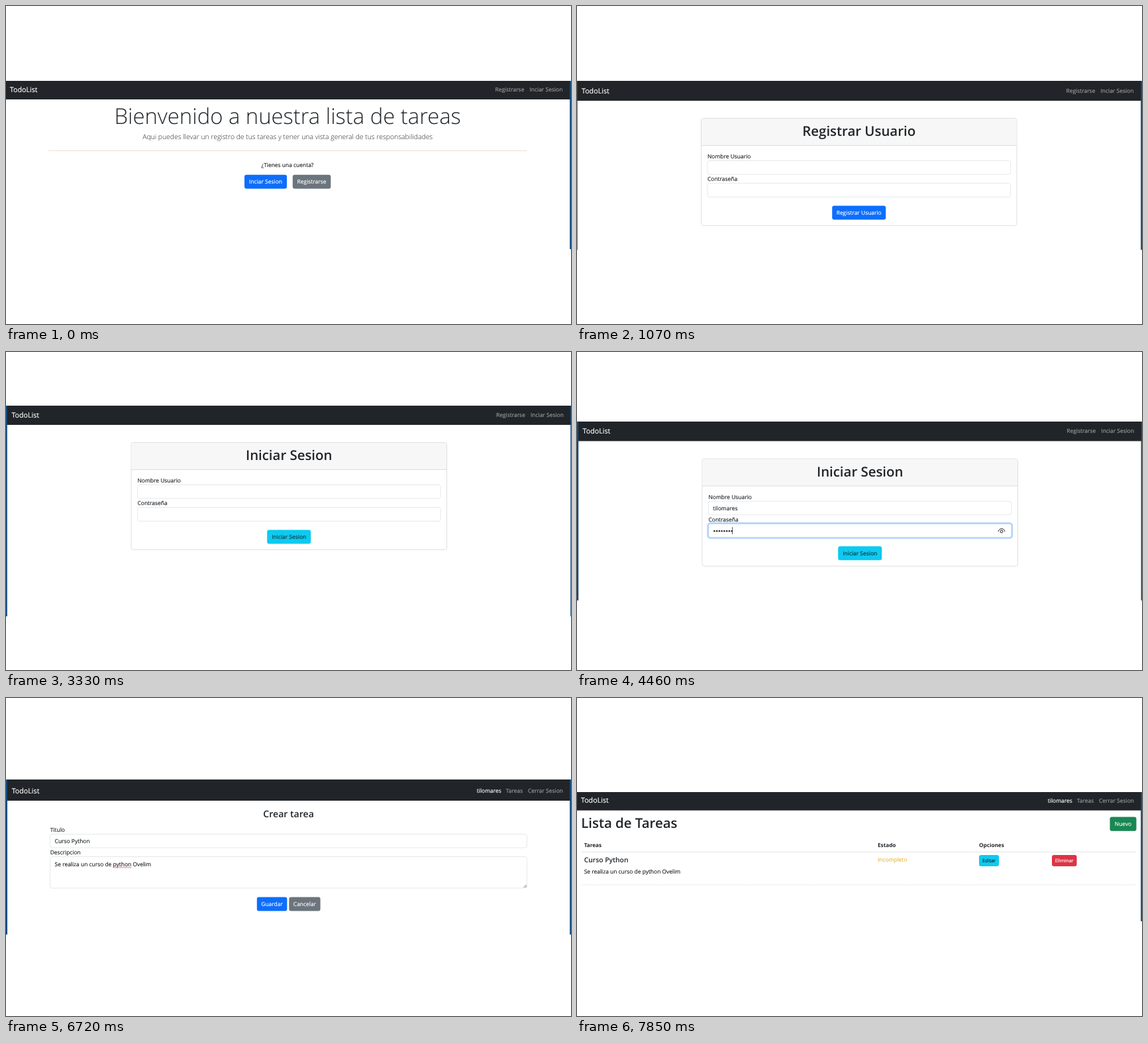
An HTML page for the animation above (8 s loop, 853 by 480 pixels).

```html
<!DOCTYPE html>
<html lang="es">
<head>
<meta charset="utf-8">
<title>TodoList</title>
<style>
  html, body { margin: 0; width: 100%; height: 100%; overflow: hidden; background: #fff; }
  svg { display: block; width: 100vw; height: 100vh; }
  text { font-family: "Open Sans", "Noto Sans", sans-serif; text-rendering: geometricPrecision; white-space: pre; }
</style>
</head>
<body>
<svg id="stage" viewBox="0 0 853 480"></svg>
<script>
const stage = document.getElementById('stage');
const LOOP = 8000;
const USER = 'tilomares';
const TASK = 'Curso Python';
const NOTE = 'Se realiza un curso de python Ovelim';
const INK = '#212529', MUTED = '#9b9d9e', EDGE = '#0f4a80';
const BLUE = '#0d6efd', GREY = '#6c757d', CYAN = '#0dcaf0', GREEN = '#198754', RED = '#dc3545';

const rect = (x, y, w, h, fill, extra = '') =>
  `<rect x="${x}" y="${y}" width="${w}" height="${h}" fill="${fill}" ${extra}/>`;

// Regular text gets a hairline stroke for a slightly sturdier look.
const text = (x, y, str, { size = 8.45, fill = INK, weight = 400, anchor = 'start' } = {}) =>
  `<text x="${x}" y="${y}" font-size="${size}" fill="${fill}" font-weight="${weight}" text-anchor="${anchor}"` +
  `${weight === 400 ? ` stroke="${fill}" stroke-width="0.15"` : ''}>${str}</text>`;

const path = (d, stroke, width = 1, extra = '') =>
  `<path d="${d}" fill="none" stroke="${stroke}" stroke-width="${width}" ${extra}/>`;

const centered = (x, y, str, opts) => text(x, y, str, { ...opts, anchor: 'middle' });

const button = (x, y, w, h, label, fill, ink = '#fff', size = 8.45) =>
  rect(x, y, w, h, fill, 'rx="3"') + centered(x + w / 2, y + h / 2 + size * 0.36, label, { size, fill: ink });

const field = (x, y, w, h, stroke = '#e6e8eb') =>
  rect(x, y, w, h, '#fff', `rx="3" stroke="${stroke}" stroke-width="1"`);

const dots = (x, y) =>
  Array.from({ length: 8 }, (_, i) => `<circle cx="${x + i * 3.75}" cy="${y}" r="1.25" fill="${INK}"/>`).join('');

// Dark bar plus the slivers of desktop visible beside the window.
function frame({ top, bar, bottom, left = 0, right, brandX, base, links }) {
  const h = bottom - top;
  return rect(0, top, 853, bar, INK) +
    (left ? rect(0, top, left, h, EDGE) : '') +
    rect(right, top, 853 - right, h, EDGE) +
    text(brandX, base + 0.6, 'TodoList', { size: 10.7, fill: '#fff' }) +
    links.map(([x, str, fill = MUTED]) => text(x, base, str, { fill })).join('');
}

const guest = dx => [[738.5 + dx, 'Registrarse'], [790.5 + dx, 'Inciar Sesion']];
const member = [[710.8, USER, '#fff'], [754.8, 'Tareas'], [788, 'Cerrar Sesion']];

// Login and sign-up card; x and y are its top left corner.
function card(x, y, { title, action, fill, ink, width, user = '', secret, focus }) {
  const mid = x + 238.2;
  let out = rect(x, y, 476.5, 162, '#fff', 'rx="3.5" stroke="#dedfe0"') +
    `<path d="M${x + 0.5} ${y + 41}V${y + 4}q0-3.5 3.5-3.5H${x + 472.5}q3.5 0 3.5 3.5V${y + 41}z" fill="#f7f7f7"/>` +
    path(`M${x} ${y + 41}h476.5`, '#dcddde') +
    centered(mid, y + 26.7, title, { size: 20.4, weight: 600 }) +
    text(x + 9.5, y + 60.3, 'Nombre Usuario') +
    field(x + 9.5, y + 64, 457.5, 20.5) +
    text(x + 16.5, y + 77.5, user) +
    text(x + 9.5, y + 94.5, 'Contraseña');
  if (focus) {
    out += rect(x + 8.5, y + 97.2, 459.5, 22.3, '#fff', 'rx="4" stroke="#bdd8fd" stroke-width="2.6"');
  }
  out += field(x + 9.5, y + 98, 457.5, 20.8, focus ? '#a4c9fc' : undefined);
  if (secret) out += dots(x + 18.4, y + 109);
  if (focus) {
    const ex = x + 452, ey = y + 108.5;
    out += path(`M${x + 45.6} ${y + 103}v11`, INK, 0.8) +
      path(`M${ex - 5} ${ey + 1.5}C${ex - 3.8} ${ey - 4.6} ${ex + 3.8} ${ey - 4.6} ${ex + 5} ${ey + 1.5}`, INK) +
      `<circle cx="${ex}" cy="${ey + 1.2}" r="2" fill="none" stroke="${INK}"/>`;
  }
  return out + button(mid - width / 2, y + 132, width, 21, action, fill, ink);
}

const signUp = { title: 'Registrar Usuario', action: 'Registrar Usuario', fill: BLUE, ink: '#fff', width: 81 };
const signIn = { title: 'Iniciar Sesion', action: 'Iniciar Sesion', fill: CYAN, ink: '#16323a', width: 66 };

const home = () =>
  frame({ top: 113, bar: 28, bottom: 367, right: 851.2, brandX: 5.8, base: 129.2, links: guest(0) }) +
  centered(425.2, 177.6, 'Bienvenido a nuestra lista de tareas', { size: 32.8, weight: 300 }) +
  centered(425.2, 201.2, 'Aqui puedes llevar un registro de tus tareas y tener una vista general de tus responsabilidades',
    { size: 10.4, weight: 300 }) +
  path('M64 218.5H786.5', '#f1dcd5') +
  centered(425, 242.8, '¿Tienes una cuenta?') +
  button(360, 254.8, 64, 21, 'Inciar Sesion', BLUE) +
  button(432.8, 254.8, 57.5, 21, 'Registrarse', GREY);

const register = (bottom, filled) =>
  frame({ top: 113, bar: 30, bottom, left: 0.7, right: 851.2, brandX: 7, base: 131, links: guest(0) }) +
  card(187.5, 169.5, { ...signUp, ...filled });

const login = () =>
  frame({ top: 81, bar: 29, bottom: 399, left: 1.8, right: 852.2, brandX: 8.4, base: 98.2, links: guest(1.5) }) +
  card(189, 136.5, signIn);

const loginFilled = () =>
  frame({ top: 105, bar: 29.5, bottom: 375, left: 2.2, right: 851.6, brandX: 8.6, base: 122.4, links: guest(0.8) }) +
  card(189, 161.2, { ...signIn, user: USER, secret: true, focus: true });

function list(top, bottom, filled) {
  const y = n => top + n;
  let out = frame({ top, bar: 27.7, bottom, right: 851.2, brandX: 6, base: y(15.8), links: member }) +
    text(6.3, y(54.2), 'Lista de Tareas', { size: 20.4, weight: 600 }) +
    button(804.5, y(37.5), 40, 21.2, 'Nuevo', GREEN) +
    [[10.7, 'Tareas'], [454, 'Estado'], [607, 'Opciones']]
      .map(([x, str]) => text(x, y(82.6), str, { size: 8.2, weight: 700 })).join('') +
    path(`M7 ${y(90.5)}H844`, '#cfd2d5', 1, 'stroke-dasharray="1.5 1"');
  if (filled) {
    out += text(10.7, y(106.2), TASK, { size: 10.3, weight: 600 }) +
      text(10.7, y(123.2), NOTE) +
      text(454, y(105.4), 'Incompleto', { fill: '#e5b93c' }) +
      button(607, y(95), 30, 17, 'Editar', CYAN, '#10262c', 7.3) +
      button(717, y(95), 37.5, 17, 'Eliminar', RED, '#fff', 7.3) +
      path(`M7 ${y(140)}H844`, '#dfe2e5', 1, 'stroke-dasharray="2 1"');
  }
  return out;
}

const create = () =>
  frame({ top: 123, bar: 32, bottom: 357, left: 2, right: 851.2, brandX: 8.7, base: 143.2, links: member }) +
  centered(426.6, 179.6, 'Crear tarea', { size: 14.1, weight: 600 }) +
  text(66.7, 202, 'Titulo') +
  field(66.5, 205.5, 720, 20.5) +
  text(73.6, 219.2, TASK) +
  text(66.7, 236.4, 'Descripcion') +
  field(66.5, 239.5, 720, 47.5) +
  text(73.6, 253.8, NOTE) +
  path('M161.5 255.7' + 'q1 -1.4 2 0t2 0'.repeat(7), '#d9363e', 0.8) +
  path('M781.5 286l4-4M784 286l1.8-1.8', '#555', 0.8) +
  button(378.8, 300.5, 45.6, 21, 'Guardar', BLUE) +
  button(427.3, 300.5, 47.3, 21, 'Cancelar', GREY);

const scenes = [
  [0, home()],
  [1070, register(368)],
  [2200, register(366, { user: USER, secret: true })],
  [3330, login()],
  [4460, loginFilled()],
  [5590, list(113, 368, false)],
  [6720, create()],
  [7850, list(142, 337, true)]
];

stage.innerHTML = scenes.map(([, art]) => `<g display="none">${art}</g>`).join('');
const groups = [...stage.children];
let shown = -1;

function draw(ms) {
  const t = ms % LOOP;
  let now = scenes.length - 1;
  while (scenes[now][0] > t) now--;
  if (now === shown) return;
  groups.forEach((g, i) => g.setAttribute('display', i === now ? 'inline' : 'none'));
  shown = now;
}

function tick() {
  draw(performance.now());
  requestAnimationFrame(tick);
}
tick();
</script>
</body>
</html>
```
